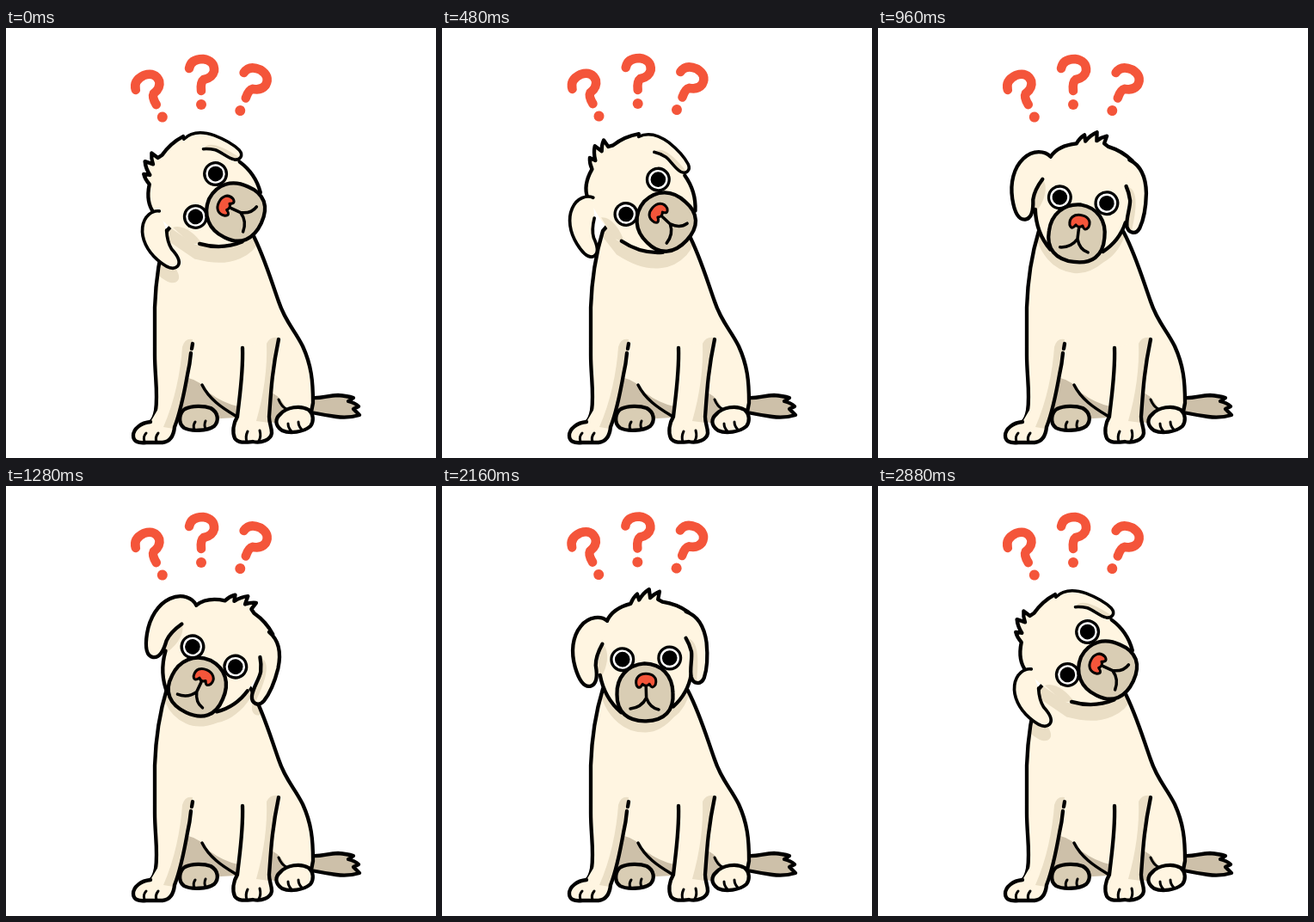
Animation of 500x500 px, one loop 2.96 s. Source, as an HTML page with a canvas:

```html
<!DOCTYPE html>
<html>
<head>
<meta charset="utf-8">
<style>
html, body { margin: 0; width: 100%; height: 100%; overflow: hidden; background: #fff; }
canvas { display: block; width: 100vmin; height: 100vmin; }
</style>
</head>
<body>
<canvas width="500" height="500"></canvas>
<script>
const ctx = document.querySelector('canvas').getContext('2d');
const INK = '#000', CREAM = '#fff5e1', TAN = '#eadec5', MUZZLE = '#d9cdb4', DARK = '#cdc0a9', RED = '#f4553a';
const LOOP = 2960;

const P = d => new Path2D(d);
const clamp = v => Math.max(0, Math.min(1, v));
const ease = (t, from, to) => {
  const u = clamp((t - from) / (to - from));
  return u * u * (3 - 2 * u);
};

function fill(path, color) { ctx.fillStyle = color; ctx.fill(path); }
function line(path, width = 4.3, color = INK) {
  ctx.lineWidth = width; ctx.strokeStyle = color; ctx.stroke(path);
}
function shape(path, color, width) { fill(path, color); line(path, width); }
function disc(x, y, r, color) {
  ctx.beginPath(); ctx.arc(x, y, r, 0, 7); ctx.fillStyle = color; ctx.fill();
}

// paints with the point (px, py) moved to (x, y), turned and scaled about it
function placed({ x, y, px = x, py = y, turn = 0, scale = 1 }, paint) {
  ctx.save();
  ctx.translate(x, y);
  ctx.rotate(turn * Math.PI / 180);
  ctx.scale(scale, scale);
  ctx.translate(-px, -py);
  paint();
  ctx.restore();
}

const body = {
  tail: P('M355 430C368 431 374 427 386 427Q397 428 404 430L398 434Q406 436 410 440L404 443L411 450Q398 454 384 452Q370 450 355 447Z'),
  torso: P('M355 446L357 436C357 410 355 392 345 370C335 350 325 342 317 318C307 290 300 265 286 238L270 215L205 215L187 236C179 262 174 295 173 325L173 380C173 405 177 425 174 445Q172 455 168 458'),
  gap: P('M212 407Q226 410 236 424Q252 436 270 440L268 453L196 457Z'),
  bellyLine: P('M228 415C236 431 250 441 267 451'),
  knee: P('M309 424Q321 430 326 444L316 460L307 458Z'),
  kneeLine: P('M317 432Q320 440 326 443'),
  leftHind: P('M208 443C216 439 230 439 238 442C247 447 248 457 242 463C234 469 214 469 207 465C199 459 202 447 208 443Z'),
  rightHind: P('M319 449C326 441 342 438 352 444C358 449 358 458 354 463C346 470 330 472 321 468C312 462 313 454 319 449Z'),
  leftLeg: P('M168 458C157 459 148 466 148 474C148 481 154 483 163 482L182 482C191 481 195 474 196 464C203 446 208 420 211 403Q214 390 215 378M216 373L217 367'),
  leftShade: P('M205 371Q208 360 217 362L211 403C207 428 201 448 195 466L183 464C196 435 203 400 205 371Z'),
  rightLeg: P('M275 372C276 400 272 425 269 452C264 460 263 470 266 477C270 483 278 482 287 481C297 483 308 479 309 471C309 464 306 460 306 452C308 425 309 400 317 362'),
  rightShade: P('M303 367Q307 358 317 360C309 400 308 425 306 459L291 457C300 425 304 395 303 367Z'),
  toes: P('M163 471Q159 475 161 481M177 471Q173 476 175 481M281 469Q278 475 280 481M295 468Q297 475 294 480M220 458Q217 462 219 467M232 457Q230 462 232 466M328 460Q328 465 332 469M340 458Q340 463 344 467')
};

const TOP = 'M193 156C198 146 208 140 221 137Q224 130 229 126L231 133Q236 125 243 121L244 131Q249 126 255 124L253 133L258 136Q275 139 288 149';
const head = {
  skull: P(TOP + 'L294 190L289 222C285 240 276 252 268 257Q252 274 235 274Q216 274 203 262C190 250 184 236 180 214L185 183Z'),
  top: P(TOP),
  cheeks: P('M183 219C186 238 194 252 206 263M289 221C286 236 279 248 267 258'),
  shade: P('M187 183C195 190 193 208 184 222L179 210Z'),
  muzzle: P('M202 242C202 222 215 208 235 207C255 208 267 222 267 242C268 263 256 274 235 274C214 274 201 263 202 242Z'),
  nose: P('M225 232C223 223 229 219 236 219C244 219 250 224 247 232Q243 238 240 231Q236 235 232 231Q228 238 225 232Z'),
  mouth: P('M236 235L236 247Q230 258 217 259M236 247Q240 259 250 261'),
  leftEar: P('M193 156C186 150 172 150 162 162C152 174 150 192 155 210C159 224 165 234 173 232C180 230 181 220 179 208C179 198 183 190 187 183'),
  rightEar: P('M285 148C298 153 306 166 308 185C309 200 308 215 304 226C300 235 291 233 289 225C287 216 291 204 290 195Q288 186 284 179'),
  rightEarShade: P('M284 179C296 180 300 195 295 230L289 225C287 216 291 204 290 195Z')
};

const hook = P('M-15-13Q-13-24 1-24Q15-22 14-10Q12-2 2 0Q-2 3-1 13');
const marks = [
  { x: 170, y: 77, turn: -26 },
  { x: 228, y: 60, turn: 0 },
  { x: 285, y: 70, turn: 24 }
];

function drawMarks(t) {
  const sway = (1 - Math.cos(Math.floor(t / 80) * Math.PI / 2)) / 2;
  for (const { x, y, turn } of marks) {
    placed({ x: x + sway * .7, y: y - sway, px: 0, py: 0, turn }, () => {
      line(hook, 10.5, RED);
      disc(-1, 29, 6, RED);
    });
  }
}

function drawBody(castShadow) {
  const b = body;
  shape(b.tail, DARK);
  fill(b.torso, CREAM);
  ctx.save();
  ctx.clip(b.torso);
  castShadow();
  ctx.restore();
  fill(b.gap, DARK);
  line(b.bellyLine, 3.5);
  fill(b.knee, DARK);
  line(b.torso);
  line(b.kneeLine, 3);
  shape(b.leftHind, MUZZLE);
  shape(b.rightHind, CREAM);
  for (const side of ['left', 'right']) {
    fill(b[side + 'Leg'], CREAM);
    fill(b[side + 'Shade'], TAN);
    line(b[side + 'Leg']);
  }
  line(b.toes, 3);
}

// the ears trail the head: one lifts and folds on a left tilt, one swings on a right tilt
function eachEar(lift, swing, paint) {
  placed({ x: 190, y: 168, turn: 32 * lift, scale: 1 - .14 * lift }, () => paint(head.leftEar));
  placed({ x: 288, y: 165, turn: -7 * swing, scale: 1 - .18 * lift }, () => paint(head.rightEar, head.rightEarShade));
}

function drawHead(lift, swing) {
  fill(head.skull, CREAM);
  fill(head.shade, TAN);
  line(head.top);
  line(head.cheeks);
  eachEar(lift, swing, (ear, shade) => {
    fill(ear, CREAM);
    if (shade) fill(shade, TAN);
    line(ear);
  });
  for (const x of [209.5, 264.5]) {
    disc(x, 201.5, 14.5, INK);
    disc(x, 201.5, 11.2, '#fff');
    disc(x, 201.5, 8.8, INK);
  }
  shape(head.muzzle, MUZZLE);
  line(head.mouth, 3.5);
  shape(head.nose, RED, 3);
}

function draw(now) {
  const t = now % LOOP;
  const quick = (t >= 80 && t < 640) || t >= 2320;
  const step = quick ? 40 : 80;
  const pose = Math.floor(t / step) * step;
  const turn = -65 + 90 * (ease(pose, 160, 1280) - ease(pose, 1900, 2620));
  const lift = clamp(-turn / 48), swing = clamp(turn / 24);
  const x = 237.5 + .15 * turn + .001 * turn * turn;
  const y = 201 - .1 * Math.abs(turn);
  const inHead = (drop, paint) => placed({ x, y: y + drop, px: 237, py: 201.5, turn }, paint);

  ctx.fillStyle = '#fff';
  ctx.fillRect(0, 0, 500, 500);
  ctx.lineCap = ctx.lineJoin = 'round';
  drawMarks(t);
  drawBody(() => inHead(13 + 4 * lift, () => {
    fill(head.skull, TAN);
    eachEar(lift, swing, ear => fill(ear, TAN));
  }));
  inHead(0, () => drawHead(lift, swing));
}

const start = performance.now();
function tick() {
  draw(performance.now() - start);
  requestAnimationFrame(tick);
}
tick();
</script>
</body>
</html>
```
